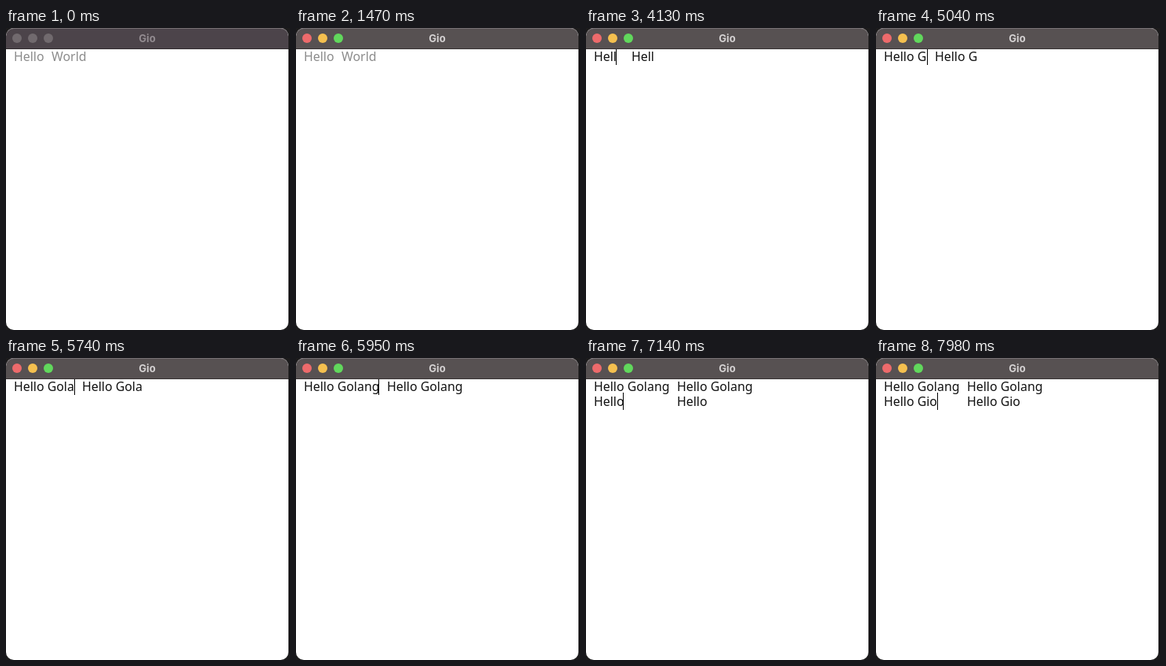
Animation of 362x384 px, one loop 8000 ms. Source, as an HTML page:

```html
<!DOCTYPE html>
<html lang="en">
<head>
<meta charset="utf-8">
<title>Gio</title>
<style>
  html, body { margin: 0; width: 100%; height: 100%; overflow: hidden; background: #1c1b1c; }
  #window {
    position: absolute; left: 0; top: 0; width: 360px; height: 384px;
    border-radius: 10px; overflow: hidden; background: #fff;
  }
  #bar {
    position: absolute; inset: 0 0 auto; height: 27px; box-sizing: border-box;
    background: #4c444a; border-bottom: 1px solid #322c30;
    border-radius: 10px 10px 0 0; box-shadow: inset 0 1px #777074;
    color: #938c91; font: 700 13px/26px Inter, sans-serif; text-align: center;
  }
  #bar i {
    position: absolute; top: 7px; width: 12px; height: 12px;
    border-radius: 50%; background: #716a6e;
  }
  #bar i:nth-of-type(1) { left: 8px; }
  #bar i:nth-of-type(2) { left: 28px; }
  #bar i:nth-of-type(3) { left: 48px; }
  .focused #bar { background: #575152; border-color: #383334; color: #d5d2d3; }
  .focused #bar i:nth-of-type(1) { background: #ed6a6b; }
  .focused #bar i:nth-of-type(2) { background: #f5c04f; }
  .focused #bar i:nth-of-type(3) { background: #61d85c; }
  .text {
    position: absolute; top: 27px; left: 10px; white-space: pre;
    font: 15.9px/19px "Noto Sans", sans-serif; color: #111;
  }
  .hint { color: #8b8b8b; }
  #caret { position: absolute; width: 1px; background: #000; }
</style>
</head>
<body>
<div id="window">
  <div id="bar"><i></i><i></i><i></i>Gio</div>
  <div class="text" id="editor"></div>
  <div class="text" id="mirror"></div>
  <div id="caret"></div>
</div>
<script>
  const LOOP = 8000, FOCUS = 1470, LEFT = 10, GAP = 10;
  const script = "Hello Golang\nHello Gio";
  const keyTimes = [
    3640, 3850, 4060, 4130, 4340, 4690, 5040, 5180, 5390, 5740, 5810, 5950,
    6230, 6650, 6790, 6930, 7070, 7140, 7350, 7630, 7910, 7980
  ];
  const blinks = [1540, 2030, 2590, 3080];

  const [win, editor, mirror, caret] =
    ["window", "editor", "mirror", "caret"].map(id => document.getElementById(id));

  const ruler = document.createElement("canvas").getContext("2d");
  ruler.font = '16.6px "Liberation Sans", sans-serif';
  const advance = text => ruler.measureText(text).width;

  const countPast = (times, t) => times.filter(at => at <= t).length;

  function show(t) {
    const typed = script.slice(0, countPast(keyTimes, t));
    const lines = typed.split("\n");
    const row = lines.length - 1;
    const width = Math.max(advance("Hello"), ...lines.map(advance));

    win.classList.toggle("focused", t >= FOCUS);
    editor.textContent = typed || "Hello";
    mirror.textContent = typed || "World";
    for (const el of [editor, mirror]) el.classList.toggle("hint", !typed);
    mirror.style.left = Math.round(LEFT + width + GAP) + "px";

    const lit = typed || countPast(blinks, t) % 2;
    caret.style.visibility = lit ? "visible" : "hidden";
    caret.style.left = Math.floor(LEFT + advance(lines[row])) + "px";
    caret.style.top = (row ? 44 : 27) + "px";
    caret.style.height = (row ? 22 : 20) + "px";
  }

  const start = performance.now();
  function tick() {
    show((performance.now() - start) % LOOP);
    requestAnimationFrame(tick);
  }
  tick();
</script>
</body>
</html>
```
